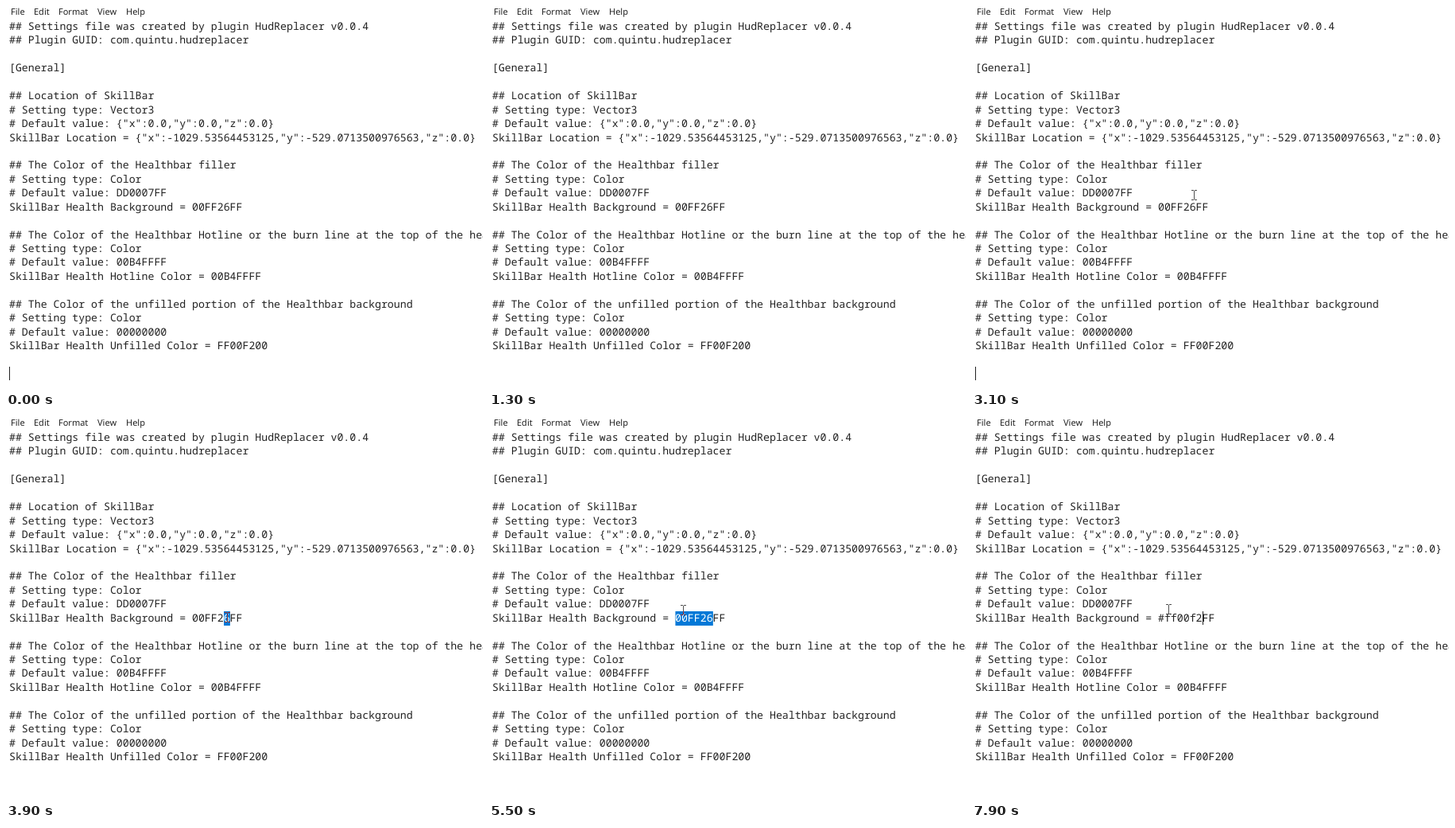
Animation of 600x481 px, one loop 8000 ms. Source, as an HTML page with a canvas:

```html
<!DOCTYPE html>
<html lang="en">
<head>
<meta charset="utf-8">
<title>Settings file</title>
<style>
html, body { margin: 0; width: 100%; height: 100%; overflow: hidden; background: #fff; }
canvas { display: block; }
</style>
</head>
<body>
<canvas id="stage" width="600" height="481"></canvas>
<script>
const ctx = document.getElementById('stage').getContext('2d');
const LOOP = 8000;
const LEFT = 4, BASE = 30, PITCH = 17.44, ADVANCE = 7.94;
const MONO = '13.233px "Noto Sans Mono", "DejaVu Sans Mono", monospace';
const MENU = '11px "Noto Sans", "Open Sans", sans-serif';
const INK = '#222';
const BLINK = 530;
const CLICK = 3850, DRAG_END = 4130, PASTE = 5650;
const EDIT_ROW = 13, EDIT_COL = 29, OLD = '00FF26', NEW = '#ff00f2';

const menu = [['File', 6], ['Edit', 35], ['Format', 66], ['View', 115], ['Help', 151]];

const lines = [
  '## Settings file was created by plugin HudReplacer v0.0.4',
  '## Plugin GUID: com.quintu.hudreplacer',
  '',
  '[General]',
  '',
  '## Location of SkillBar',
  '# Setting type: Vector3',
  '# Default value: {"x":0.0,"y":0.0,"z":0.0}',
  'SkillBar Location = {"x":-1029.53564453125,"y":-529.0713500976563,"z":0.0}',
  '',
  '## The Color of the Healthbar filler',
  '# Setting type: Color',
  '# Default value: DD0007FF',
  'SkillBar Health Background = ',
  '',
  '## The Color of the Healthbar Hotline or the burn line at the top of the healthbar',
  '# Setting type: Color',
  '# Default value: 00B4FFFF',
  'SkillBar Health Hotline Color = 00B4FFFF',
  '',
  '## The Color of the unfilled portion of the Healthbar background',
  '# Setting type: Color',
  '# Default value: 00000000',
  'SkillBar Health Unfilled Color = FF00F200'
];

// time, x, y of the mouse pointer
const path = [
  [1600, 340, 490], [1900, 322, 410], [2600, 280, 239], [3100, 279, 237],
  [3750, 282, 250], [CLICK, 282, 251], [DRAG_END, 235, 248], [4300, 245, 243],
  [5500, 244, 242], [6300, 246, 241], [7900, 247, 241]
];

const colX = col => LEFT + col * ADVANCE;
const rowY = row => Math.round(BASE + row * PITCH);

function pointerAt(t) {
  if (t < path[0][0]) return null;
  const i = path.findIndex(p => p[0] > t);
  if (i < 0) return path[path.length - 1].slice(1);
  const a = path[i - 1], b = path[i];
  const k = (t - a[0]) / (b[0] - a[0]);
  const e = k * k * (3 - 2 * k);
  return [a[1] + (b[1] - a[1]) * e, a[2] + (b[2] - a[2]) * e];
}

function drawCaret(row, col) {
  ctx.fillStyle = INK;
  ctx.fillRect(Math.round(colX(col)), rowY(row) - 13, 1, 17);
}

function drawSelection(from, to) {
  const x = colX(from), y = rowY(EDIT_ROW) - 13, w = colX(to) - x;
  ctx.save();
  ctx.beginPath();
  ctx.rect(x, y, w, 18);
  ctx.clip();
  ctx.fillStyle = '#0078d7';
  ctx.fillRect(x, y, w, 18);
  ctx.fillStyle = '#fff';
  ctx.fillText(lines[EDIT_ROW] + OLD, LEFT, rowY(EDIT_ROW));
  ctx.restore();
}

function drawPointer(x, y) {
  x = Math.round(x);
  y = Math.round(y);
  ctx.save();
  ctx.globalCompositeOperation = 'difference';
  ctx.fillStyle = '#b0b0b0';
  ctx.fillRect(x, y - 5, 1, 11);
  for (const dy of [-6, 6]) {
    ctx.fillRect(x - 3, y + dy, 3, 1);
    ctx.fillRect(x + 1, y + dy, 3, 1);
  }
  ctx.restore();
}

function draw(t) {
  ctx.fillStyle = '#fff';
  ctx.fillRect(0, 0, 600, 481);
  ctx.fillStyle = INK;
  ctx.textRendering = 'geometricPrecision';
  ctx.font = MENU;
  for (const [label, x] of menu) ctx.fillText(label, x, 11);

  ctx.font = MONO;
  lines.forEach((line, row) => {
    const value = row === EDIT_ROW ? (t < PASTE ? OLD : NEW) + 'FF' : '';
    ctx.fillText(line + value, LEFT, rowY(row));
  });

  const pointer = pointerAt(t);
  const blinkOn = start => (t - start) % (2 * BLINK) < BLINK;
  if (t < CLICK) {
    if (blinkOn(-450)) drawCaret(25, 0);
  } else if (t < PASTE) {
    const end = EDIT_COL + OLD.length;
    const col = t < DRAG_END ? Math.round((pointer[0] - LEFT) / ADVANCE) : EDIT_COL;
    if (col < end) drawSelection(Math.max(col, EDIT_COL), end);
    else drawCaret(EDIT_ROW, end);
  } else if (blinkOn(PASTE)) {
    drawCaret(EDIT_ROW, EDIT_COL + NEW.length);
  }
  if (pointer) drawPointer(...pointer);
}

function tick() {
  draw(performance.now() % LOOP);
  requestAnimationFrame(tick);
}
tick();
</script>
</body>
</html>
```
